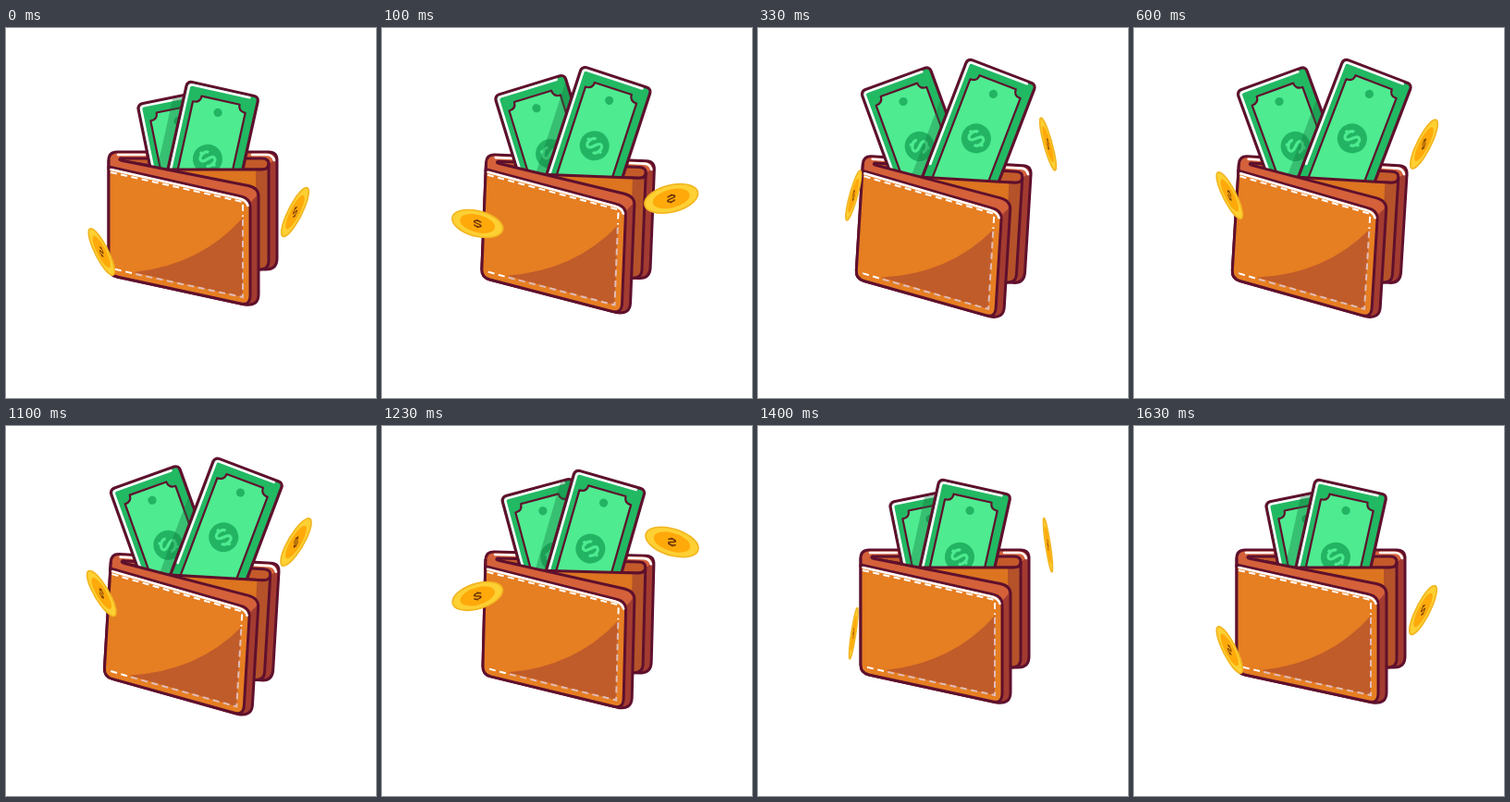
Recreate the animation shown at these times as an HTML page. Size 400 px wide and 400 px high, loop 2.01 s.

```html
<!DOCTYPE html>
<html lang="en">
<head>
<meta charset="utf-8">
<title>Wallet</title>
<style>
html, body { margin: 0; width: 100%; height: 100%; overflow: hidden; background: #fff; }
svg { display: block; width: 100vw; height: 100vh; }
.line { stroke: #5f102d; stroke-width: 3; stroke-linejoin: round; stroke-linecap: round; }
.light { fill: none; stroke: #fff; stroke-width: 2.6; stroke-linecap: round; }
.stitch { fill: none; stroke: #fff; stroke-width: 2; stroke-dasharray: 7 4.5; }
.pale { stroke: #e0bcb8; }
</style>
</head>
<body>
<svg viewBox="0 0 400 400">
  <defs>
    <path id="dollar" fill="none" stroke="currentColor" stroke-width="3.200" d="M6-4C5-9-6-9-6-4S6-1 6 4S-5 9-6 4M0-7V-11M0 7V11"/>
    <g id="bill">
      <rect class="line" x="-39.500" y="-1" width="79" height="151" rx="5" fill="#22b963" style="stroke-width:3.200"/>
      <path class="light" d="M-36.500 120V5q0-3.300 3.300-3.300H30"/>
      <path class="line" fill="#4eeb90" style="stroke-width:2.200" d="M-21 11.500H21Q21 19 29 19V140H-29V19Q-21 19-21 11.500Z"/>
      <g fill="#22b463">
        <circle cy="25" r="4.600"/>
        <circle cy="76.500" r="16"/>
      </g>
      <use href="#dollar" color="#4eeb90" transform="translate(0 76.500) rotate(-60)"/>
    </g>
    <g id="coin">
      <circle r="29" fill="#fdd033" stroke="#f2b520" stroke-width="1.600" vector-effect="non-scaling-stroke"/>
      <circle r="20" fill="#ffa90b"/>
      <use href="#dollar" color="#6b3308" transform="scale(.62 .85)"/>
    </g>
    <clipPath id="backArea"><rect id="backClip" x="-38" y=".5" width="76" height="149" rx="4"/></clipPath>
  </defs>

  <g id="rear">
    <path class="line" fill="#a33b30" d="M111 152V143Q111 134 120 134H284Q293 134 293 143V249Q293 261 281 261H265V180Z"/>
    <path fill="#d4613a" d="M112.500 152V143Q113 135.500 120 135.500H283Q290 136 290 143L284 147Q284 141 278 141L150 155Z"/>
    <path class="light" d="M121 137H150M266 137H282q6 0 8 6"/>
    <path class="line" fill="#c45a2a" d="M124 141H277Q284 141 284 147T276 153H180L124 143.500Z"/>
  </g>

  <use id="back" href="#bill"/>
  <g clip-path="url(#backArea)">
    <rect id="shade" x="-51" y="0" width="60" height="150" fill="#14793f" opacity=".38"/>
  </g>
  <use id="front" href="#bill"/>

  <g id="face">
    <path fill="#dc7420" d="M160 153H276Q284 153 284 147V252Q284 261 274 261H200Z"/>
    <path fill="#b5522a" d="M270 153H276Q284 153 284 147V252Q284 261 274 261H270Z"/>
    <path class="line" fill="none" d="M172 153H276Q284 153 284 147V252Q284 261 274 261"/>
    <path fill="#a33b30" d="M112 150L124 143L262 170.500Q273 173 273 182V288Q273 301 258 299L120 269Z"/>
    <path fill="#d4613a" d="M112.500 151V144L124 143L262 170.500Q271 173 272 180L265 188Q263 184 257 183Z"/>
    <path class="line" fill="none" d="M124 141Q121 142.500 126 143.500L262 170.500Q273 173 273 182V288Q273 301 258 299L120 269Q111 267 111 258V143"/>
    <path class="line" fill="#e67e22" d="M111 150L254 182Q264 184 264 194V289Q264 300 254 298L120 269Q111 267 111 258Z"/>
    <path fill="#c05c2a" d="M138 264Q211 256 256 205V291Z"/>
    <path class="light" d="M113.500 153L251 184q9 2 10.500 8"/>
    <path class="stitch" d="M113 156L256 188V204"/>
    <path class="stitch pale" d="M256 207V291L138 265.500"/>
    <path class="stitch" d="M136 265L117 260.500"/>
  </g>

  <use id="left" href="#coin"/>
  <use id="right" href="#coin"/>
</svg>
<script>
const LOOP = 2010, STEP = 33.5, DOWN = 32;
const $ = id => document.getElementById(id);
const place = (id, value) => $(id).setAttribute("transform", value);
const mix = (a, b, p) => a + (b - a) * p;
const unit = x => Math.min(1, Math.max(0, x));
const smooth = x => (x = unit(x), x * x * (3 - 2 * x));
const easeOut = (x, power = 3) => 1 - (1 - unit(x)) ** power;

// from and to: x, y, angle of the top middle of a bill
function billPose(from, to, p) {
  const [x, y, angle] = from.map((v, i) => mix(v, to[i], p));
  return `translate(${x} ${y}) rotate(${angle})`;
}

// A disc seen at a slant, turning about its own upright diameter
function placeCoin(id, x, y, turn, size, mirror) {
  const a = turn * Math.PI / 180;
  const m = [mirror * Math.sin(a), -0.86 * Math.cos(a), 0, 0.5].map(v => v * size);
  place(id, `matrix(${m} ${x} ${y})`);
}

function draw(now) {
  const k = Math.floor(now % LOOP / STEP + 0.4) % 60;
  const d = k - DOWN;
  const rising = d < 0;

  const open = rising ? easeOut(k / 10) : 1 - smooth(d / 9);
  const leftUp = rising ? smooth(k / 6) : 1 - smooth((d - 3.7) / 9.8);
  const rightUp = rising ? smooth((k - 1) / 7) : 1 - smooth((d - 9) / 8);
  const turn = rising
    ? -30 - 540 * easeOut(k / 18)
    : -570 - 180 * easeOut((d - 0.8) / 16.2, 1.8);

  const wallet = `translate(${mix(200, 197.8, open)} ${mix(215, 224.5, open)}) rotate(${3.5 * open}) translate(-200 -215)`;
  place("rear", wallet);
  place("face", wallet);

  const frontPose = billPose([234.5, 67, 12.5], [263.3, 48, 21], open);
  const backPose = billPose([181, 76, -11.5], [148.5, 56, -20], open);
  place("front", frontPose);
  place("shade", frontPose);
  place("back", backPose);
  place("backClip", backPose);

  placeCoin("left", 103.3, mix(242, 181, leftUp), turn, 0.97, 1);
  placeCoin("right", mix(312.5, 313.5, rightUp), mix(199, 125.5, rightUp), turn, 1.02, -1);
}

const start = performance.now();
function tick() {
  draw(performance.now() - start);
  requestAnimationFrame(tick);
}
tick();
</script>
</body>
</html>
```
